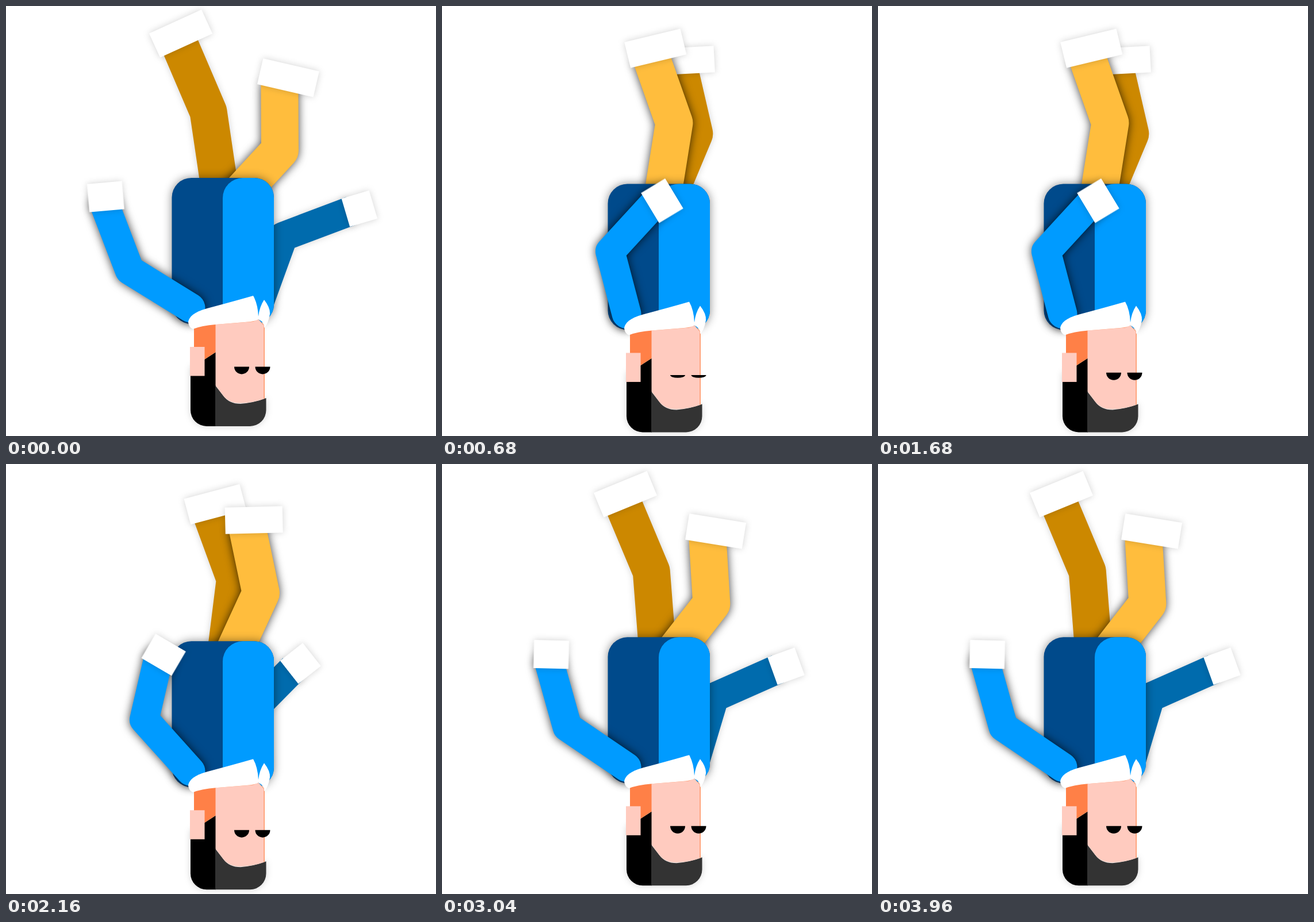
These frames come from a looping animation (748x748 px, 4 s). An HTML page:

```html
<!DOCTYPE html>
<html lang="en">
<head>
<meta charset="utf-8">
<title>Upside-down walk</title>
<style>
  html, body { margin: 0; width: 100%; height: 100%; overflow: hidden; background: #fff; }
  svg { display: block; width: 100%; height: 100%; }
  .limb { fill: none; stroke-linejoin: round; }
  .near .limb { filter: drop-shadow(0 0 8px rgba(0, 0, 0, .75)); }
  .torso { filter: drop-shadow(0 0 8px rgba(0, 0, 0, .45)); }
  .end, .far .limb, .hair { filter: drop-shadow(0 0 6px rgba(0, 0, 0, .18)); }
  .end { fill: #fff; }
</style>
</head>
<body>
<svg viewBox="0 0 748 748">
  <g id="figure">
    <g id="backArm" class="far"></g>
    <g id="backLeg" class="far"></g>
    <g id="frontLeg" class="near"></g>
    <g class="torso">
      <rect x="288.5" y="0" width="177.5" height="254" rx="34" fill="#004a8b"/>
      <path d="M377 35a35 35 0 0 1 35-35h20a34 34 0 0 1 34 34v186a34 34 0 0 1-34 34h-55z" fill="#009bff"/>
    </g>
    <g id="frontArm" class="near"></g>
    <g class="hair">
      <path d="M365 303L345 316 321 330V404a28 28 0 0 0 28 28H365z"/>
      <path d="M364 361L378 379Q388 393 408 393 432 391 452.5 383V404a28 28 0 0 1-28 28H364z" fill="#333"/>
    </g>
    <path d="M327 255L439 246 449.8 257V384H440V303H365L345 316 327 328z" fill="#ff8047"/>
    <path d="M364.5 255L430 250 439 246 448.6 257V384.5Q430 391 408 392 388 392 378 379L364.5 361z" fill="#ffcbbf"/>
    <rect x="320" y="294" width="25.5" height="50.5" fill="#ffcbbf"/>
    <g id="eyes">
      <path d="M397 328.4h26a13 13 0 0 1-26 0z"/>
      <path d="M433.5 328.4h26a13 13 0 0 1-26 0z"/>
    </g>
    <path d="M317 251C319 239 332 232 350 227Q395 215 430 205 438 219 439 241 441 224 449 212 460 226 459 237 456 255 449 261 450 251 439 246 434 250 415 251L365 255Q340 257 325 263 318 260 317 251z" fill="#fff"/>
  </g>
</svg>
<script>
const LOOP = 4000, CYCLE = 1000, STEP = 40;
const byId = id => document.getElementById(id);

// Each limb bends through three key poses: start, middle and end of a swing.
// A pose is: joint x y, end x y, angle of hand or foot; y counts from the torso's top.
const legKeys = [
  [476.5, -48, 476, -154, 13],
  [422, -98, 391, -202, -8.5],
  [352, -115, 304.5, -226, -24.5]
];
const frontArmKeys = [
  [215, 160.5, 175.5, 57, -5],
  [275, 122, 333, 41.5, 52],
  [394.5, 108, 490.5, 56.5, 76]
];
const backArmKeys = [
  [482, 102, 591, 61, 73.5],
  [384, 138, 412, 55, 32],
  [286, 190, 233, 76, -18]
];

// Quadratic curve through the three keys.
const blend = ([a, b, c], s) => a.map((v, i) =>
  v * (1 - s) * (1 - 2 * s) + b[i] * 4 * s * (1 - s) + c[i] * s * (2 * s - 1));

function shape(parent, tag, attrs) {
  const el = document.createElementNS("http://www.w3.org/2000/svg", tag);
  for (const name in attrs) el.setAttribute(name, attrs[name]);
  return parent.appendChild(el);
}

// Returns a function that poses the limb for a swing from 0 to 1.
function makeLimb(id, keys, root, color, thick, [x, width, height]) {
  const group = byId(id);
  const line = shape(group, "path", { class: "limb", stroke: color, "stroke-width": thick });
  const end = shape(group, "rect", { class: "end", x, y: -height, width, height });
  return swing => {
    const [jx, jy, ex, ey, angle] = blend(keys, swing);
    const reach = 1 + 10 / Math.hypot(ex - jx, ey - jy);
    const tip = [jx + (ex - jx) * reach, jy + (ey - jy) * reach];
    line.setAttribute("d", `M${root}L${jx},${jy} ${tip}`);
    end.setAttribute("transform", `translate(${ex} ${ey}) rotate(${angle})`);
    return line;
  };
}

const hip = [377.7, 59], foot = [-40, 100, 46];
const backArm = makeLimb("backArm", backArmKeys, [437, 226], "#006bad", 51, [-26, 51, 50]);
const frontArm = makeLimb("frontArm", frontArmKeys, [321, 226], "#009bff", 51, [-30.5, 61, 49]);
const backLeg = makeLimb("backLeg", legKeys, hip, "#cc8800", 65, foot);
const frontLeg = makeLimb("frontLeg", legKeys, hip, "#ffbd3d", 65, foot);
byId("frontArm").setAttribute("stroke-linecap", "round");

const softTurn = s => Math.hypot(s, .05) - .05;

function draw(time) {
  const t = Math.floor(time % LOOP / STEP) * STEP;
  const phase = t % CYCLE / CYCLE;
  const swing = 2 * Math.min(phase, 1 - phase);
  const dip = 29 * Math.min(swing, 1 - swing);
  const open = Math.min(1, .05 + .95 * Math.abs(t - 720) / 120);

  byId("figure").setAttribute("transform", `translate(0 ${299 + dip})`);
  byId("eyes").setAttribute("transform", `translate(0 ${335 * (1 - open)}) scale(1 ${open})`);
  frontLeg(swing);
  backLeg(1 - swing);
  frontArm(softTurn(swing));
  backArm(softTurn(swing));
}

const start = performance.now();
function tick() {
  draw(performance.now() - start);
  requestAnimationFrame(tick);
}
tick();
</script>
</body>
</html>
```
